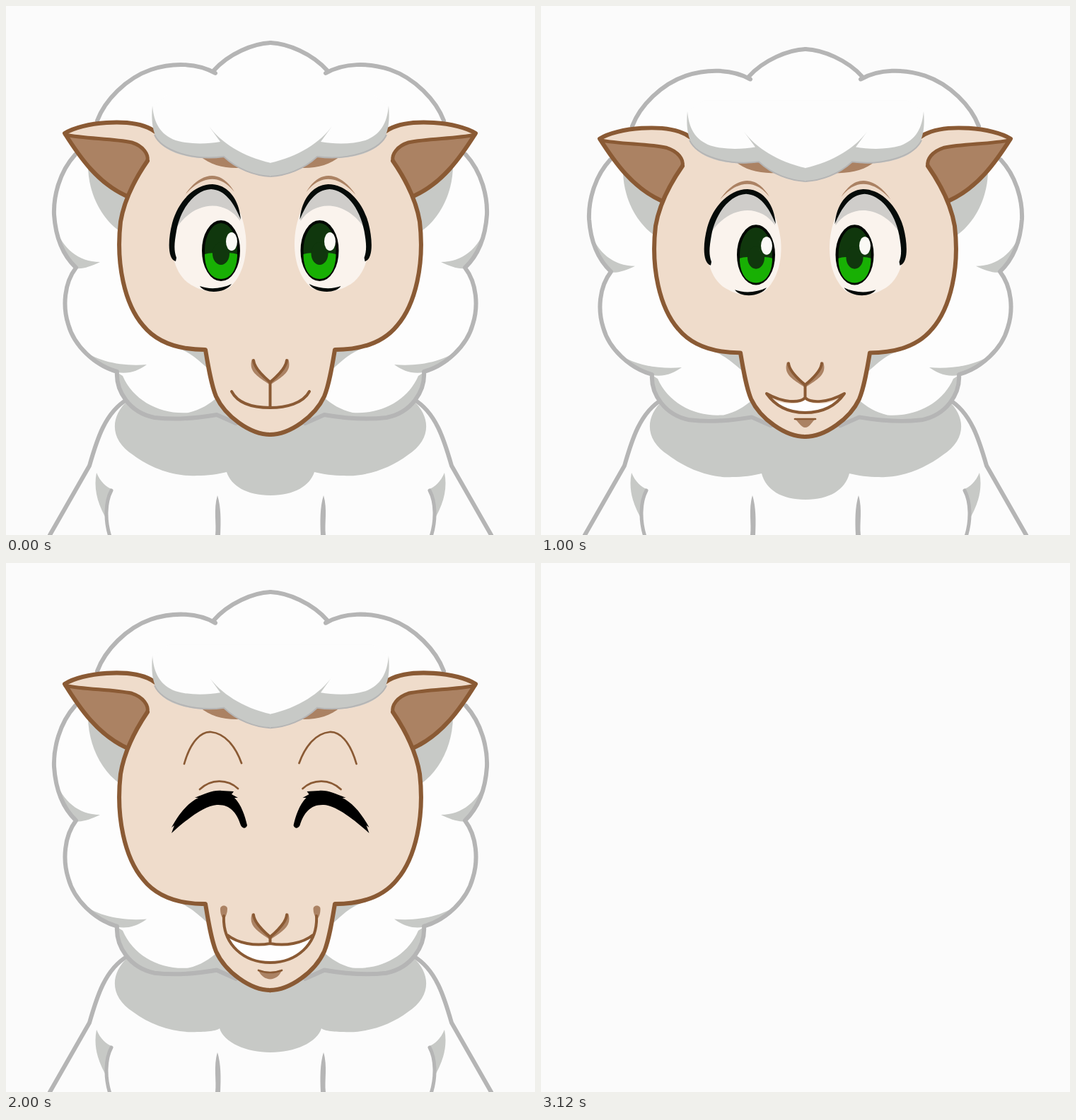
These frames come from a looping animation (748x748 px, 3250 ms). An HTML page:

```html
<!DOCTYPE html>
<html lang="en">
<head>
<meta charset="utf-8">
<title>Smiling sheep</title>
<style>
  html, body { margin: 0; width: 100%; height: 100%; overflow: hidden; background: #fbfbfb; }
  svg { display: block; width: 100%; height: 100%; }
  .wool { fill: #fdfdfd; }
  .shade { fill: #c7c9c6; }
  .edge { fill: none; stroke: #b5b5b5; stroke-width: 6; stroke-linejoin: round; stroke-linecap: round; }
  .skin { fill: #efdccb; }
  .tan { fill: #ab8263; }
  .line { fill: none; stroke: #8a5a34; stroke-width: 6; stroke-linejoin: round; stroke-linecap: round; }
  .medium { stroke-width: 5; }
  .thin { stroke-width: 4; }
  .hair { stroke-width: 2.7; }
</style>
</head>
<body>
<svg viewBox="0 0 748 748">
  <defs>
    <g id="bodyHalf">
      <path fill="#fcfcfc" d="M375 556H168C140 574 128 615 118 650L62 748H375Z"/>
      <path class="shade" d="M128 660C133 672 142 681 150 683C142 695 140 708 140 722C128 700 124 680 128 660Z"/>
      <path class="edge medium" d="M149 685C140 702 140 728 147 750"/>
      <path fill="#b5b5b5" d="M299 692C293 712 298 732 296 748H303C304 728 304 708 299 692Z"/>
      <path class="edge" d="M172 556C140 574 128 615 118 650L62 748"/>
    </g>
    <g id="woolHalf">
      <path class="wool" d="M375 52C350 53 315 67 293 92L296 95C270 80 235 80 205 90C170 102 140 133 129 162L98 210C75 235 67 270 68 295C70 325 80 352 99 370C82 392 80 425 88 450C96 480 125 508 157 517C155 545 175 575 210 582C245 586 275 582 298 578L375 595Z"/>
      <path class="shade" d="M70 314C80 342 102 362 133 362C120 368 110 372 99 371C84 356 74 336 70 314Z"/>
      <path class="shade" d="M104 483C127 503 165 510 199 507C188 515 175 521 157 518C136 512 116 500 104 483Z"/>
      <path class="shade" d="M157 518L165 523C180 558 218 578 258 575C275 571 288 563 300 552L325 590L300 582C275 585 245 586 210 583C175 575 155 545 157 518Z"/>
      <path class="shade" d="M116 225C116 265 135 300 160 318L174 268Z"/>
      <path class="shade" d="M243 480L287 486V514C274 503 262 490 243 484Z"/>
      <path class="edge" d="M374 52C350 53 315 67 293 92L296 95C270 80 235 80 205 90C170 102 140 133 129 162M98 210C75 235 67 270 68 295C70 325 80 352 99 370C82 392 80 425 88 450C96 480 125 508 157 517C155 545 175 575 210 582C245 586 275 582 298 578L325 590"/>
    </g>
    <g id="faceHalf">
      <path class="skin" d="M82 180C108 164 160 158 188 167L216 180L230 190H375V606C345 606 310 580 297 552C290 535 286 510 282 486C250 486 216 479 194 452C168 422 155 365 162 305C164 290 167 278 171 268C130 250 105 215 82 180Z"/>
      <path class="tan" d="M84 183C112 188 150 187 178 194C194 199 202 210 201 219C189 232 180 250 171 269C130 250 107 217 84 183Z"/>
      <path class="line medium" d="M84 182C112 188 150 187 178 193C194 198 202 210 200 219"/>
      <path class="line" d="M216 181L205 174C175 158 108 164 83 180C105 215 130 250 169 268M200 219C180 248 167 275 162 305C155 365 168 422 194 452C216 479 250 486 282 486C286 510 290 535 297 552C310 580 345 606 374 606"/>
      <path class="tan" d="M274 212C292 228 320 232 347 227L320 210Z"/>
    </g>
    <g id="bangHalf">
      <path class="shade" d="M207 141C205 165 207 187 225 200C245 214 280 218 308 213C327 231 352 240 375 241V150Z"/>
      <path fill="none" stroke="#b5b5b5" stroke-width="2" d="M210 182C220 205 265 219 308 213C327 231 352 240 374 241"/>
      <path class="wool" d="M207 141C209 165 218 182 240 190C260 196 285 195 303 192L287 170C303 192 334 213 375 222V125H230Z"/>
    </g>
    <g id="eyeHalf">
      <path fill="#faf3ed" d="M237 357C230 300 255 258 290 254C320 258 335 290 339 325C342 358 332 385 315 399C300 405 280 405 265 396C250 389 241 374 237 357Z"/>
      <path fill="#cfcdca" d="M242 312C250 275 275 256 292 256C315 258 330 280 331 304C312 275 270 273 242 312Z"/>
      <path fill="#050b09" d="M240 361C228 358 229 330 235 307C244 274 268 252 292 252C315 253 330 275 332 302C322 278 310 260 290 259C268 260 247 285 241 318C238 335 237 345 241 356Z"/>
      <path fill="#050b09" d="M274 396C287 401 305 400 319 393C311 406 282 408 274 396Z"/>
      <path class="tan" d="M253 267C270 241 300 224 323 263C304 239 280 237 253 267Z"/>
      <ellipse cx="304" cy="346" rx="25" ry="41" fill="#10370d" stroke="#020702" stroke-width="4"/>
      <path fill="#18b004" d="M281 351Q292 347 304 352Q316 347 327 351C327 372 318 386 304 386C290 386 281 372 281 351Z"/>
      <ellipse cx="304" cy="350" rx="12" ry="16" fill="#10370d"/>
    </g>
    <g id="noseHalf">
      <path class="tan" d="M348 499C342 517 356 524 374 536V530C360 520 352 513 348 499Z"/>
      <path class="line thin" d="M350 501Q351 513 373.5 532"/>
    </g>
    <g id="happyHalf">
      <path d="M234 382L238 371L234 374C246 352 258 339 272 332L267 332C283 326 292 321 305 322L322 323L319 327L328 332L323 332C333 342 338 358 341 371C339 376 335 376 332 371C326 352 316 341 298 342C282 343 258 360 234 382Z"/>
      <path class="line hair" d="M252 284C261 252 276 238 290 239C309 241 324 258 333 283M274 320C290 305 313 305 328 319"/>
      <path class="tan" d="M303 489C303 483 313 483 313 489C313 495 311 499 308 505C304 499 303 495 303 489Z"/>
    </g>
  </defs>

  <g id="sheep">
    <g data-mirror="bodyHalf" data-axis="748"></g>
    <path id="neck" class="shade"/>
    <g id="head">
      <g data-mirror="woolHalf" data-axis="748"></g>
      <g data-mirror="faceHalf" data-axis="747"></g>
      <g data-mirror="bangHalf" data-axis="748"></g>
      <g id="openEyes">
        <g data-mirror="eyeHalf" data-axis="747.5"></g>
        <g fill="#faf9f5">
          <ellipse cx="319" cy="333" rx="8" ry="13"/>
          <ellipse cx="458" cy="333" rx="8" ry="13"/>
        </g>
      </g>
      <g data-mirror="noseHalf" data-axis="747"></g>
      <path id="calmMouth" class="line thin" d="M373.5 532V567M319 545C328 562 350 568 373.5 568C396 568 420 562 429 545"/>
    </g>
    <g id="softMouth">
      <path fill="#fefefe" d="M328 557C348 565 365 563 373.5 557C382 563 400 565 420 557C410 570 392 574 373.5 574C355 574 338 570 328 557Z"/>
      <path class="line thin" d="M373.5 537V554C365 562 342 561 319 548C333 568 353 575 373.5 575C395 575 415 568 429 548C406 561 382 562 373.5 554"/>
      <path class="tan" d="M360 585H387C382 589 380 596 373.5 596C368 596 365 589 360 585Z"/>
      <path class="line hair" d="M359 584H388"/>
    </g>
    <g id="happy">
      <g data-mirror="happyHalf" data-axis="747.5"></g>
      <path fill="#fefefe" d="M313 526C328 538 352 542 373.5 538C395 542 419 538 434 526C424 552 400 565 373.5 565C347 565 323 552 313 526Z"/>
      <path class="line thin" d="M308 499C306 540 337 565 373.5 565C410 565 441 540 439 499M313 526C328 538 352 542 373.5 538C395 542 419 538 434 526M373.5 528V538"/>
      <path class="tan" d="M357 576C367 580 380 580 390 576C384 592 364 593 357 576Z"/>
      <path class="line hair" d="M357 576C367 580 380 580 390 576"/>
    </g>
  </g>
</svg>
<script>
const byId = id => document.getElementById(id);

// Fill each symmetric group with a half and its reflection.
for (const group of document.querySelectorAll("[data-mirror]")) {
  const { mirror, axis } = group.dataset;
  group.innerHTML = `<use href="#${mirror}"/><use href="#${mirror}" transform="translate(${axis}) scale(-1 1)"/>`;
}

// The head stretches vertically: y -> y * stretch + shift.
const poses = {
  calm: { stretch: 1, shift: 0, mouth: "calmMouth", side: 664, notch: 312, low: 692 },
  dip: { stretch: 0.9892, shift: 9.6, mouth: "softMouth", side: 666, notch: 312, low: 698 },
  rise: { stretch: 1.004, shift: -2.5, mouth: "happy", drop: 6, side: 664, notch: 307, low: 693 },
  grin: { stretch: 1.0163, shift: -11.8, mouth: "happy", drop: 0, side: 663, notch: 302, low: 692 }
};

const timeline = [
  [0, "calm"], [120, "dip"], [245, "rise"], [370, "grin"], [1000, "dip"],
  [1120, "calm"], [1750, "dip"], [1870, "rise"], [2000, "grin"], [2620, "dip"],
  [2750, "calm"], [3120, "hidden"]
];
const LOOP = 3250;

function neckPath({ side, notch, low }) {
  const right = 748 - notch;
  const inner = side - 5;
  return `M172 558C148 580 145 612 180 635C205 654 240 ${side + 2} 270 ${side}
    C285 ${side} 300 ${side - 2} ${notch} ${inner}C${notch + 6} ${low - 14} 340 ${low} 374 ${low}
    C408 ${low} ${right - 6} ${low - 14} ${right} ${inner}C448 ${side - 2} 463 ${side} 478 ${side}
    C508 ${side + 2} 543 654 568 635C603 612 600 580 576 558Z`;
}

const show = (id, visible) => byId(id).setAttribute("display", visible ? "inline" : "none");

let current;
function draw(time) {
  const name = timeline.findLast(([start]) => start <= time % LOOP)[1];
  if (name === current) return;
  current = name;
  const pose = poses[name];
  show("sheep", pose);
  if (!pose) return;
  byId("head").setAttribute("transform", `matrix(1 0 0 ${pose.stretch} 0 ${pose.shift})`);
  byId("neck").setAttribute("d", neckPath(pose));
  for (const id of ["calmMouth", "softMouth", "happy"]) show(id, id === pose.mouth);
  show("openEyes", pose.mouth !== "happy");
  byId("happy").setAttribute("transform", `translate(0 ${pose.drop || 0})`);
}

const origin = performance.now();
function tick() {
  draw(performance.now() - origin);
  requestAnimationFrame(tick);
}
tick();
</script>
</body>
</html>
```
